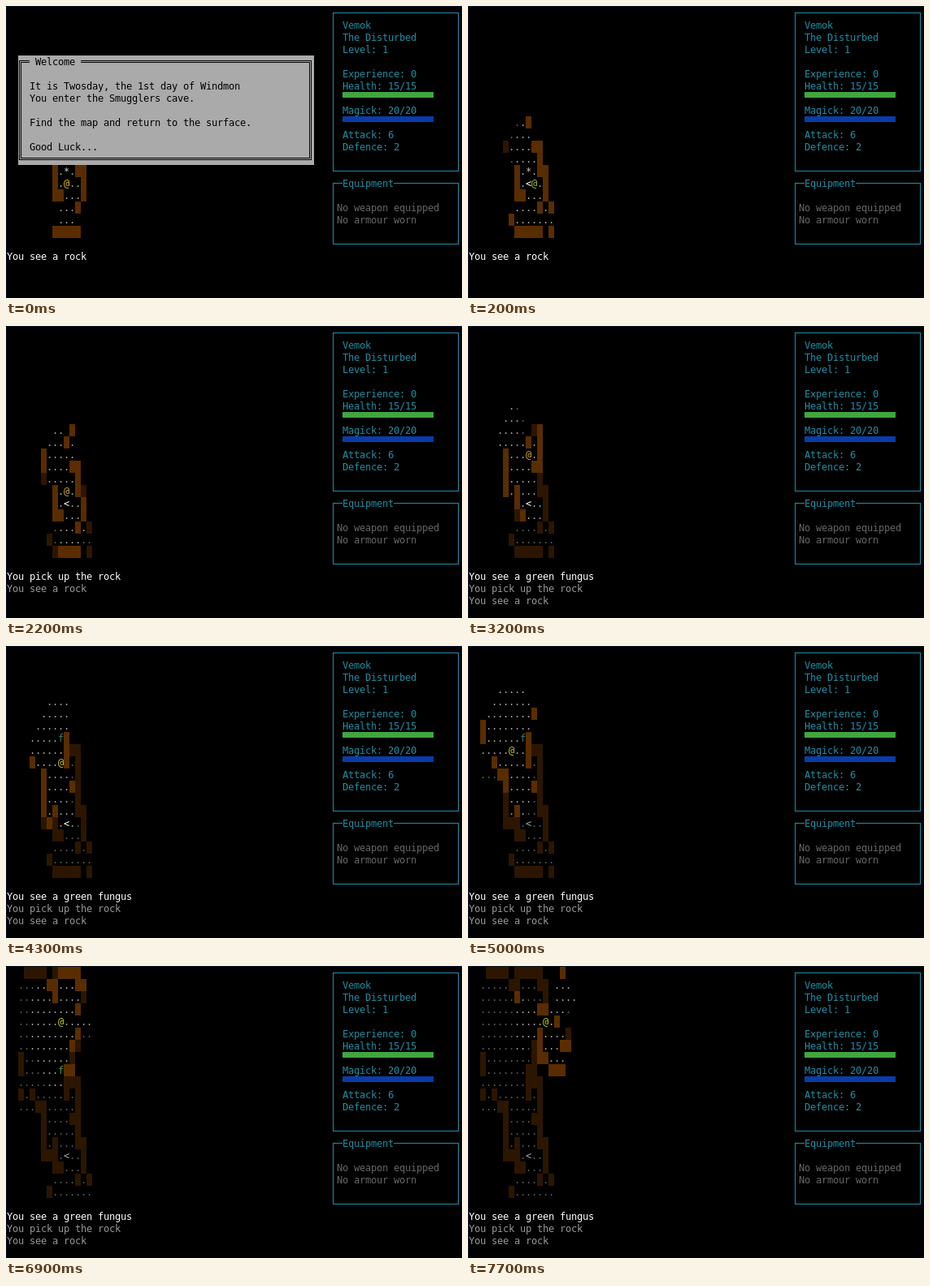
An HTML page with a canvas for the animation above (8000 ms loop, 561x360 px).

```html
<!DOCTYPE html>
<html lang="en">
<head>
<meta charset="utf-8">
<title>Cave crawl</title>
<style>
html, body { margin: 0; width: 100%; height: 100%; overflow: hidden; background: #000; }
canvas { display: block; width: 561px; height: 360px; }
</style>
</head>
<body>
<canvas id="stage" width="561" height="360"></canvas>
<script>
const ctx = document.getElementById('stage').getContext('2d');
const CELL_W = 7, CELL_H = 15, LOOP = 8000;
const MAP_LEFT = 2, MAP_TOP = -1, VIEW_ROWS = 19;
const SCROLL_AT = 5200, PICKUP_AT = 2200, SPOT_AT = 2800;
const TEAL = '#218fa6', GOLD = '#dcaa32', LIME = '#c6ce1c';

const MAP = [
  ' #### #####   #',
  '.....##...## ...',
  '......#....# ....',
  '..........##....',
  '.............#',
  '..........#....#',
  '.........##...##',
  '#........###...',
  '#.......##  ###',
  '........###',
  '#.#.....#.#',
  '...##.....#',
  '    #....##',
  '    #.....#',
  '    #.#...##',
  '    ###....#',
  '      ##...#',
  '      ....#.#',
  '     #.......',
  '      ##### #'
];

// time, column, row, player colour
const STEPS = [
  [0, 10, 14, '#e6c619'], [200, 11, 14, '#a9bf3a'], [900, 11, 13, GOLD],
  [1300, 10, 13, GOLD], [2200, 10, 13, GOLD], [2800, 10, 12, GOLD],
  [3000, 10, 11, GOLD], [3200, 10, 10, GOLD], [4000, 9, 10, GOLD],
  [4300, 9, 9, LIME], [4600, 8, 9, LIME], [4800, 7, 9, LIME],
  [5000, 7, 8, LIME], [5200, 7, 7, LIME], [5400, 7, 6, LIME],
  [5600, 7, 5, LIME], [5900, 7, 4, LIME], [6000, 7, 3, LIME],
  [6200, 7, 2, LIME], [6400, 8, 2, LIME], [6600, 9, 2, LIME],
  [6900, 9, 3, LIME], [7100, 10, 3, LIME], [7300, 11, 3, LIME],
  [7400, 12, 3, LIME], [7700, 13, 3, LIME]
];

const cellX = col => 1 + col * CELL_W;
const cellY = row => 1 + row * CELL_H;
const key = (col, row) => col + ',' + row;
const tileAt = (col, row) => (MAP[row - MAP_TOP] || '')[col - MAP_LEFT] || ' ';
// halves round away from zero
const roundOut = v => Math.sign(v) * Math.round(Math.abs(v));

// Rays run from the player to the rim of the light circle.
const rim = [];
for (let dy = -5; dy <= 5; dy++) {
  for (let dx = -5; dx <= 5; dx++) {
    const d = dx * dx + dy * dy;
    if ((d >= 25 && d <= 30) || (d === 18)) rim.push([dx, dy]);
  }
}

function fieldOfView(col, row) {
  const seen = new Set([key(col, row)]);
  for (const [dx, dy] of rim) {
    const n = Math.max(Math.abs(dx), Math.abs(dy));
    for (let i = 1; i <= n; i++) {
      const c = col + roundOut(dx * i / n), r = row + roundOut(dy * i / n);
      seen.add(key(c, r));
      if (tileAt(c, r) !== '.') break;
    }
  }
  return seen;
}

const explored = new Set();
const states = STEPS.map(([time, col, row, color]) => {
  const lit = fieldOfView(col, row);
  lit.forEach(k => explored.add(k));
  return { time, col, row, color, lit, known: new Set(explored) };
});

function text(str, col, row, color) {
  ctx.fillStyle = color;
  [...str].forEach((ch, i) => ctx.fillText(ch, cellX(col + i), cellY(row) + 12));
}

function block(col, row, cols, height, color) {
  ctx.fillStyle = color;
  ctx.fillRect(cellX(col), cellY(row), cols * CELL_W, height);
}

// Box lines run through the middle of their cells.
function frame(c0, r0, c1, r1, color, grow = 0) {
  ctx.strokeStyle = color;
  ctx.lineWidth = 1;
  ctx.strokeRect(cellX(c0) + 2.5 - grow, cellY(r0) + 7.5 - grow,
    (c1 - c0) * CELL_W + 2 * grow, (r1 - r0) * CELL_H + 2 * grow);
}

function drawMap(s) {
  const shift = s.time >= SCROLL_AT ? 1 : 0;
  MAP.forEach((line, i) => {
    const row = MAP_TOP + i, y = row + shift;
    if (y < 0 || y >= VIEW_ROWS) return;
    [...line].forEach((tile, j) => {
      const col = MAP_LEFT + j, k = key(col, row), lit = s.lit.has(k);
      if (tile === ' ' || !s.known.has(k)) return;
      if (tile === '#') block(col, y, 1, CELL_H, lit ? '#5a2d00' : '#2d1600');
      else if (col === s.col && row === s.row) text('@', col, y, s.color);
      else if (k === '10,14') text('<', col, y, lit ? '#fff' : '#aaa');
      else if (k === '10,13' && s.time < PICKUP_AT) text('*', col, y, '#ccc');
      else if (k === '9,7' && lit) text('f', col, y, s.time < SCROLL_AT ? '#2f806a' : '#3fa03f');
      else text('.', col, y, lit ? '#aaa' : '#606060');
    });
  });
}

function drawMessages(time) {
  const log = ['You see a rock'];
  if (time >= PICKUP_AT) log.unshift('You pick up the rock');
  if (time >= SPOT_AT) log.unshift('You see a green fungus');
  log.forEach((line, i) => text(line, 0, 20 + i, i ? '#999' : '#fff'));
}

function drawPanel() {
  frame(57, 0, 79, 13, TEAL);
  const stats = { 1: 'Vemok', 2: 'The Disturbed', 3: 'Level: 1', 5: 'Experience: 0',
    6: 'Health: 15/15', 8: 'Magick: 20/20', 10: 'Attack: 6', 11: 'Defence: 2' };
  for (const row in stats) text(stats[row], 59, +row, TEAL);
  block(59, 7, 16, 7, '#3fa63f');
  block(59, 9, 16, 7, '#0a3ca8');
  frame(57, 14, 79, 19, TEAL);
  block(59, 14, 9, CELL_H, '#000');
  text('Equipment', 59, 14, TEAL);
  text('No weapon equipped', 58, 16, '#686868');
  text('No armour worn', 58, 17, '#686868');
}

function drawWelcome() {
  block(2, 4, 52, 9 * CELL_H, '#aaa');
  frame(2, 4, 53, 12, '#000', 1);
  frame(2, 4, 53, 12, '#000', -1);
  block(4, 4, 9, CELL_H, '#aaa');
  text('Welcome', 5, 4, '#000');
  const lines = { 6: 'It is Twosday, the 1st day of Windmon', 7: 'You enter the Smugglers cave.',
    9: 'Find the map and return to the surface.', 11: 'Good Luck...' };
  for (const row in lines) text(lines[row], 4, +row, '#000');
}

function draw(s) {
  ctx.fillStyle = '#000';
  ctx.fillRect(0, 0, 561, 360);
  ctx.fillStyle = '#0b1220';
  ctx.fillRect(0, 0, 561, 1);
  ctx.fillRect(0, 0, 1, 360);
  ctx.font = '12px "DejaVu Sans Mono", monospace';
  drawMap(s);
  drawMessages(s.time);
  drawPanel();
  if (s.time === 0) drawWelcome();
}

const start = performance.now();
let shown = null;
function tick() {
  const t = (performance.now() - start) % LOOP;
  const state = states.filter(s => s.time <= t).pop();
  if (state !== shown) draw(shown = state);
  requestAnimationFrame(tick);
}
tick();
</script>
</body>
</html>
```
